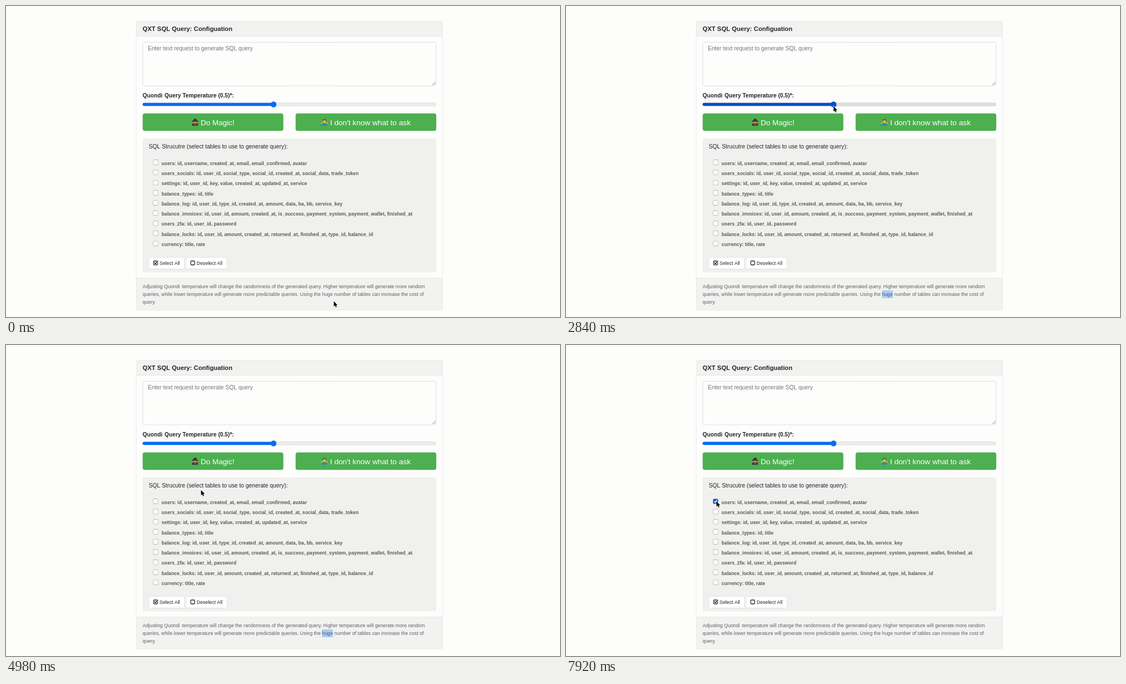
An HTML page with a canvas that plays this animation: 998x561 px, repeating every 8 s.

```html
<!DOCTYPE html>
<html lang="en">
<head>
<meta charset="utf-8">
<title>SQL query form</title>
<style>
html, body { margin: 0; width: 100%; height: 100%; overflow: hidden; background: #fdfdfc; }
canvas { display: block; width: 998px; height: 561px; }
</style>
</head>
<body>
<canvas id="stage" width="998" height="561"></canvas>
<script>
const ctx = document.getElementById('stage').getContext('2d');
const LOOP = 8000;
const GLIDE = 580;
const FAMILY = '"Liberation Sans", Arial, sans-serif';
const PAPER = '#fdfdfc', SHADE = '#f2f2f0', INK = '#222529', LINE = '#d8d8e0';
const LEFT = 246, WIDTH = 529;

const tables = [
  'users: id, username, created_at, email, email_confirmed, avatar',
  'users_socials: id, user_id, social_type, social_id, created_at, social_data, trade_token',
  'settings: id, user_id, key, value, created_at, updated_at, service',
  'balance_types: id, title',
  'balance_log: id, user_id, type_id, created_at, amount, data, ba, bb, service_key',
  'balance_invoices: id, user_id, amount, created_at, is_success, payment_system, payment_wallet, finished_at',
  'users_2fa: id, user_id, password',
  'balance_locks: id, user_id, amount, created_at, returned_at, finished_at, type_id, balance_id',
  'currency: title, rate'
];

// The pointer glides to each stop and arrives at the given time.
const start = { x: 590.5, y: 532.5 };
const stops = [
  { time: 1220, x: 578, y: 519 },
  { time: 1900, x: 340, y: 180 },
  { time: 2840, x: 482, y: 181 },
  { time: 3580, x: 440, y: 206 },
  { time: 4380, x: 386, y: 229 },
  { time: 5200, x: 335, y: 277 },
  { time: 5820, x: 269, y: 288 },
  { time: 7060, x: 268, y: 284 },
  { time: 7920, x: 271, y: 282 }
];

const clamp = v => Math.min(1, Math.max(0, v));
const ease = v => v * v * (3 - 2 * v);
const progress = (t, from, to) => ease(clamp((t - from) / (to - from)));
const lerp = (a, b, k) => a + (b - a) * k;

function pointerAt(t) {
  return stops.reduce((p, stop) => {
    const k = progress(t, stop.time - GLIDE, stop.time);
    return { x: lerp(p.x, stop.x, k), y: lerp(p.y, stop.y, k) };
  }, start);
}

function text(str, x, y, size, color = INK, weight = 'normal') {
  ctx.font = `${weight} ${size}px ${FAMILY}`;
  ctx.fillStyle = color;
  ctx.fillText(str, x, y);
}

function box(x, y, w, h, r, fill, stroke, line = 1) {
  ctx.beginPath();
  ctx.roundRect(x, y, w, h, r);
  if (stroke) { ctx.strokeStyle = stroke; ctx.lineWidth = line; ctx.stroke(); }
  if (fill) { ctx.fillStyle = fill; ctx.fill(); }
}

function dot(x, y, r, fill) {
  box(x - r, y - r, 2 * r, 2 * r, r, fill);
}

function line(color, width, ...points) {
  ctx.beginPath();
  points.forEach(([x, y]) => ctx.lineTo(x, y));
  ctx.strokeStyle = color;
  ctx.lineWidth = width;
  ctx.stroke();
}

function at(x, y, draw) {
  ctx.save();
  ctx.translate(x, y);
  draw();
  ctx.restore();
}

function tick(x, y, size, color, width) {
  line(color, width, [x - size, y], [x - size / 3, y + size * 0.7], [x + size, y - size]);
}

function wizard() {
  box(-5.5, 2, 11, 4.5, [3, 3, 0, 0], '#38343f');
  dot(0, 0.5, 3, '#e6ad69');
  box(-2.5, 1, 5, 4.5, [0, 0, 2.5, 2.5], '#8a5738');
  box(-5.5, -3, 11, 2.4, 1.2, '#43333a');
  box(-2.8, -6.3, 5.6, 4, [2.5, 2, 0, 0], '#43333a');
  box(4.4, -2.5, 1, 9, 0, '#795035');
}

function shrugger() {
  box(-5, 2, 10, 4.5, [3, 3, 0, 0], '#3488b6');
  dot(0, -2.5, 3.3, '#7d5130');
  dot(0, -1, 2.7, '#f3b831');
  for (const side of [-1, 1]) dot(side * 4.8, 1.5, 1.4, '#f3b831');
}

function slider(hovered) {
  const blue = hovered ? '#084fc7' : '#086bf4';
  box(LEFT + 0.5, 175, WIDTH - 1, 5, 2.5, hovered ? '#dedede' : '#ececec', hovered ? '#ababab' : '#bcbcbc', 0.8);
  box(LEFT, 174.8, 236, 5.4, 2.7, blue);
  dot(482, 177.5, 5.2, blue);
}

function greenButton(x, hover) {
  const [r, g, b] = [lerp(77, 56, hover), lerp(175, 142, hover), lerp(80, 60, hover)];
  box(x + 0.2, 193.8, 253.4, 31.4, 4, `rgb(${r}, ${g}, ${b})`);
}

function checkbox(y, checked) {
  box(265.3, y - 4.1, 8.4, 8.2, 1.7, checked ? '#0758c5' : '#fff', checked ? '#0758c5' : '#757575', 0.9);
  if (checked) tick(269.5, y, 2.6, '#fff', 1.3);
}

function smallButton(x, w, label, ticked) {
  box(x, 453.5, w, 20.5, 2.5, '#fff', '#cbcbd5');
  box(x + 8.5, 460, 7, 7, 1.4, null, INK, 1.3);
  if (ticked) {
    tick(x + 13, 462.8, 3.2, '#fff', 2.8);
    tick(x + 13, 462.8, 3.2, INK, 1.5);
  }
  text(label, x + 19, 466.7, 8.83);
}

function footer(selected) {
  const color = '#5f6164', size = 8.82;
  text('Adjusting Quondi', LEFT, 509.4, size, color);
  text('temperature will change the randomness of the generated query. Higher temperature will generate more random', 317, 509.4, size, color);
  const before = 'queries, while lower temperature will generate more predictable queries. Using the ';
  if (selected) {
    const x = LEFT + ctx.measureText(before).width;
    box(x, 513, ctx.measureText('huge').width, 14, 0, '#a9cdf5');
  }
  text(before + 'huge number of tables can increase the cost of', LEFT, 523.3, size, color);
  text('query.', LEFT, 537.3, size, color);
}

function arrow() {
  const shape = new Path2D('M0 0 V9.4 L2.1 7.5 L3.7 11 L5.4 10.2 L3.9 6.9 H6.8 Z');
  ctx.strokeStyle = '#fff';
  ctx.lineWidth = 1.2;
  ctx.stroke(shape);
  ctx.fillStyle = '#000';
  ctx.fill(shape);
}

function beam() {
  for (const [color, width] of [['#fff', 2.2], ['#222', 1]]) {
    line(color, width, [0, -5], [0, 5]);
    for (const y of [-5, 5]) line(color, width, [-2, y], [2, y]);
  }
}

function hand() {
  const fingers = [0, 1, 2, 3];
  const parts = (fill, stroke) => {
    fingers.forEach(i => box(i * 1.9 - 1, i ? 3.4 + i * 0.3 : 0, 2, 6, 1, fill, stroke, 1.8));
    box(-2.8, 5.2, 9, 5.6, 2.5, fill, stroke, 1.8);
  };
  parts(null, '#222');
  parts('#fff');
  for (const i of [1, 2]) line('#555', 0.6, [i * 1.9 + 0.5, 6.2], [i * 1.9 + 0.5, 8.8]);
}

function pointer({ x, y }) {
  const overText = y > 500 && y < 529;
  const overButton = x < 500 && y > 193 && y < 230;
  at(x, y, overText ? beam : overButton ? hand : arrow);
}

function card() {
  box(234.5, 27.5, 552, 521, 2.5, PAPER, LINE);
  box(235, 28, 551, 27, [2, 2, 0, 0], SHADE);
  box(235, 491, 551, 57, [0, 0, 2, 2], SHADE);
  for (const y of [54.7, 490.7]) line('#e3e3e5', 0.7, [235, y], [786, y]);
  text('QXT SQL Query: Configuation', LEFT, 45, 11.3, INK, 'bold');
}

function requestField() {
  box(LEFT + 0.5, 65.8, WIDTH - 1, 78, 2.5, PAPER, '#bfc1d1');
  text('Enter text request to generate SQL query', 255.5, 80.3, 10.35, '#707479');
  for (const size of [5.5, 2.5]) line('#777', 0.8, [773.5 - size, 142.5], [773.5, 142.5 - size]);
}

function render(t) {
  const p = pointerAt(t);
  const magicHover = progress(t, 3300, 3600) * (1 - progress(t, 4420, 4820));

  ctx.fillStyle = PAPER;
  ctx.fillRect(0, 0, 998, 561);
  card();
  requestField();

  text('Quondi', LEFT, 165.3, 10.25, INK, 'bold');
  text('Query Temperature (0.5)*:', 285.5, 165.3, 10.25, INK, 'bold');
  slider(p.y > 173 && p.y < 186);

  greenButton(LEFT, magicHover);
  greenButton(521.5, 0);
  at(340.6, 209.6, wizard);
  at(573.6, 209.6, shrugger);
  text('Do Magic!', 350.8, 214.5, 13.5, '#fff');
  text("I don't know what to ask", 583.8, 214.5, 13.65, '#fff');

  box(LEFT, 239, WIDTH, 241.5, 3, '#f0f0ee');
  text('SQL Strucutre (select tables to use to generate query):', 257.2, 257.3, 10.34);
  tables.forEach((label, i) => {
    const y = 282 + i * 18.3;
    checkbox(y, i === 0 && t >= 7340);
    text(label, 280.3, y + 4.6, 8.7, '#5a5a5a', 'bold');
  });
  smallButton(257.5, 64, 'Select All', true);
  smallButton(324.3, 73.5, 'Deselect All', false);

  footer(t >= 1250 && t < 6050);
  pointer(p);
}

function play(now) {
  render(now % LOOP);
  requestAnimationFrame(play);
}
render(0);
requestAnimationFrame(play);
</script>
</body>
</html>
```
